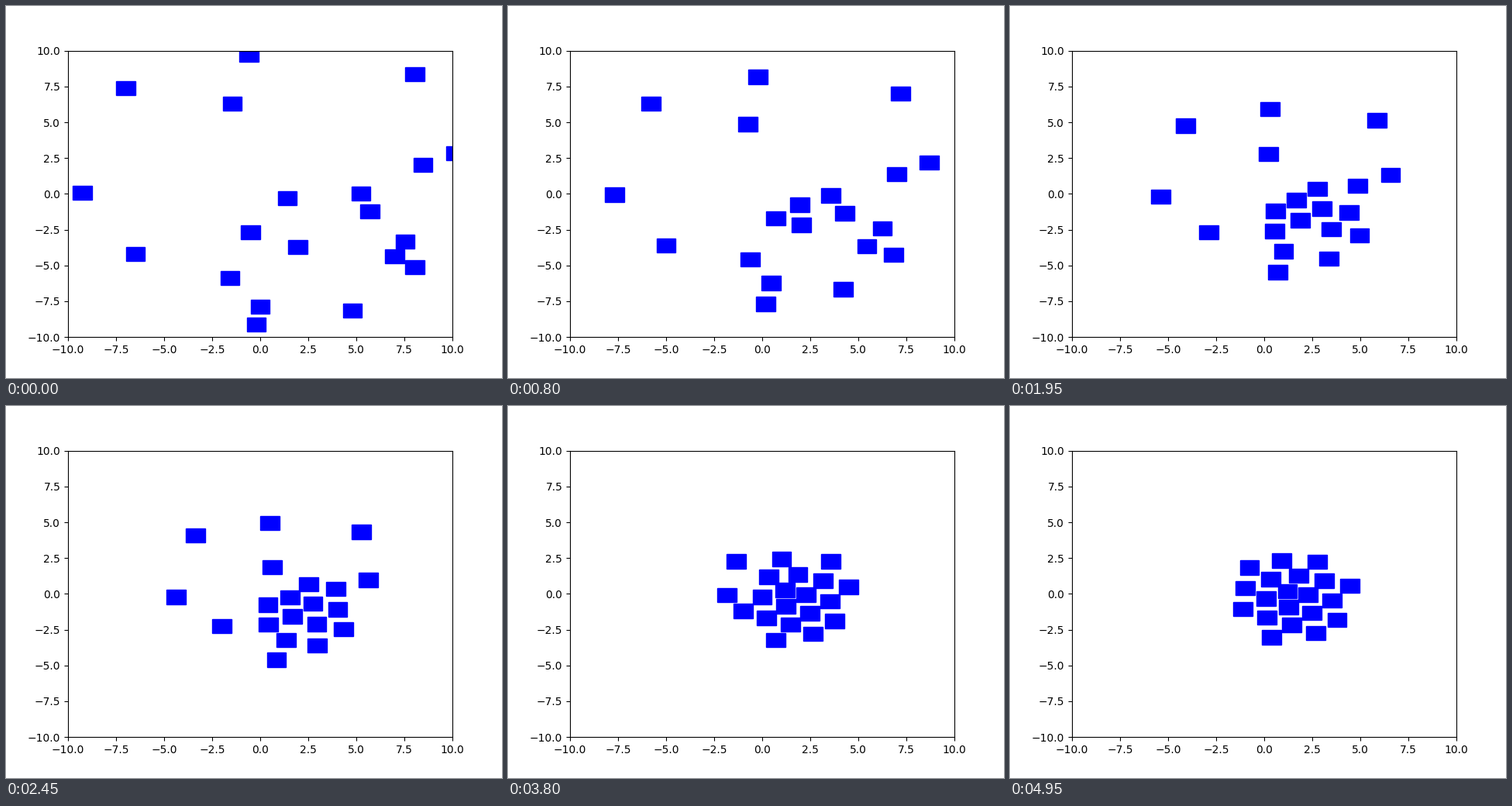
Recreate the animation shown at these times as a matplotlib script. Size 640x480 px, loop 5000 ms.

```python
import numpy as np
import matplotlib.pyplot as plt
from matplotlib.animation import FuncAnimation
from matplotlib.patches import Rectangle

FRAMES, INTERVAL = 100, 50
SPEED = 0.1      # units per frame towards the swarm's centre
MIN_DIST = 1.5   # closer pairs share the overlap and move apart
SUBSTEPS = 4

START = np.array([
    (-6.98, 7.38), (-0.60, 9.72), (-1.45, 6.30), (8.06, 8.35), (10.16, 2.84),
    (8.47, 2.02), (-9.27, 0.08), (1.41, -0.30), (5.24, 0.02), (5.69, -1.22),
    (-0.52, -2.68), (1.94, -3.71), (-6.49, -4.20), (7.54, -3.33),
    (6.98, -4.36), (8.06, -5.12), (-1.57, -5.88), (0.00, -7.88),
    (-0.20, -9.12), (4.80, -8.15)])


def split(vectors):
    """Return unit vectors and lengths, safe for zero vectors."""
    length = np.linalg.norm(vectors, axis=-1, keepdims=True)
    return vectors / np.maximum(length, 0.1), length


def velocity(pos):
    inward, _ = split(pos.mean(axis=0) - pos)
    apart, dist = split(pos[:, None] - pos)
    overlap = np.maximum(MIN_DIST - dist, 0)
    return SPEED * inward + (apart * overlap / 2).sum(axis=1)


def swarm_path():
    pos = START
    path = [pos]
    for _ in range(FRAMES - 1):
        for _ in range(SUBSTEPS):
            pos = pos + velocity(pos) / SUBSTEPS
        path.append(pos)
    return path


path = swarm_path()

fig, ax = plt.subplots(figsize=(6.4, 4.8), dpi=100)
ax.set_xlim(-10, 10)
ax.set_ylim(-10, 10)
blocks = [ax.add_patch(Rectangle((0, 0), 1, 1, color="blue", lw=1))
          for _ in START]


def draw(frame):
    for block, centre in zip(blocks, path[frame]):
        block.set_xy(centre - 0.5)
    return blocks


anim = FuncAnimation(fig, draw, frames=FRAMES, interval=INTERVAL,
                     init_func=lambda: draw(0), repeat=True, repeat_delay=0)
plt.show()
```
